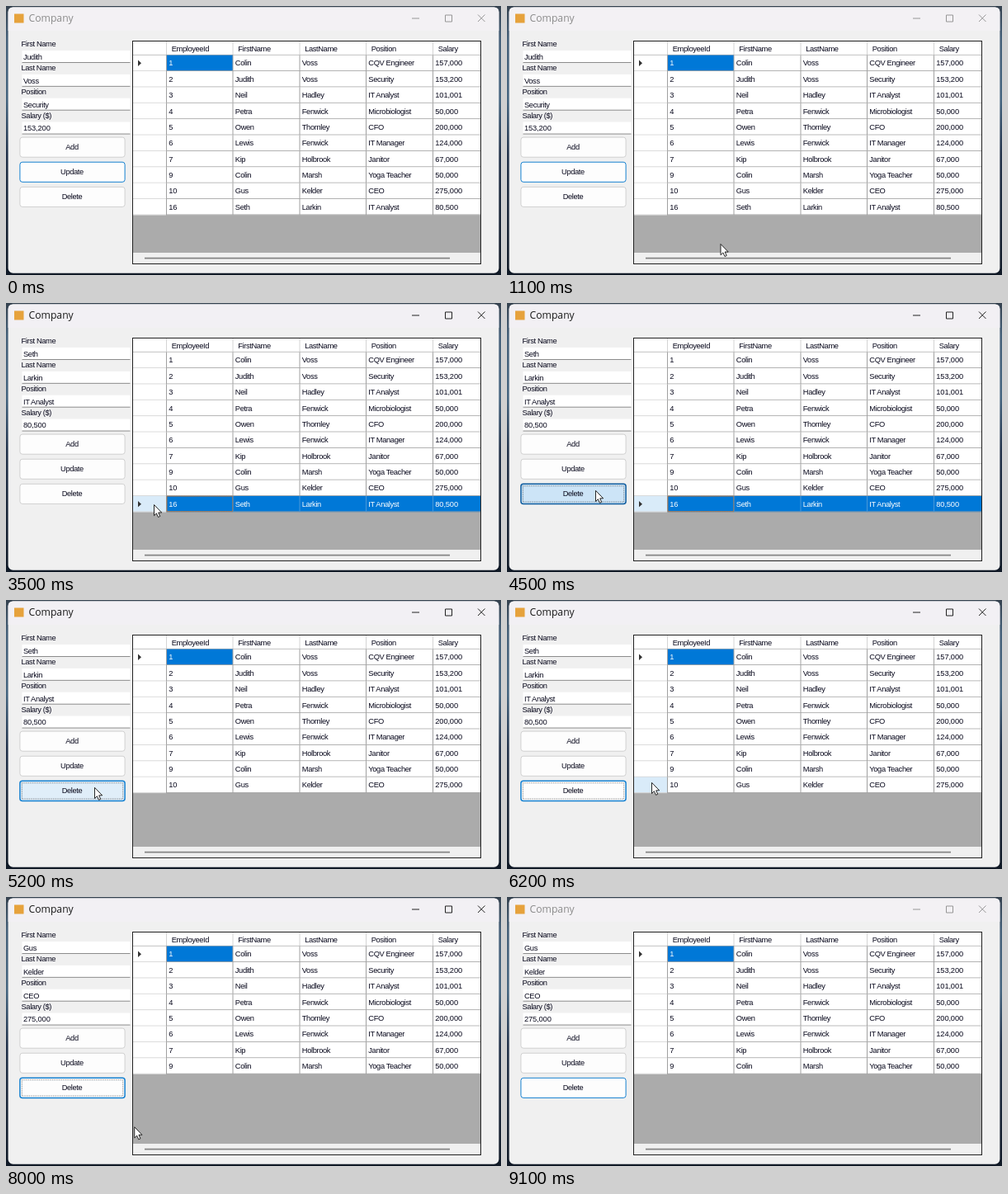
Animation, 600 px wide and 326 px high, one loop 9200 ms. Source, as an HTML page:

```html
<!DOCTYPE html>
<html lang="en">
<head>
<meta charset="utf-8">
<title>Company</title>
<style>
html, body { margin: 0; width: 100%; height: 100%; overflow: hidden; background: #141e2e; }
svg { display: block; width: 600px; height: 326px; }
text { font: 9.3px "Liberation Sans", Arial, sans-serif; letter-spacing: -.37px; fill: #08081c; white-space: pre; }
.num { letter-spacing: -.13px; }
.mid { text-anchor: middle; }
.title { font: 12.2px "Open Sans", "Noto Sans", sans-serif; letter-spacing: 0; }
</style>
</head>
<body>
<svg id="stage" viewBox="0 0 600 326">
  <defs>
    <linearGradient id="sky" x2="0" y2="1">
      <stop offset="0" stop-color="#35424f"/>
      <stop offset=".12" stop-color="#456079"/>
      <stop offset=".35" stop-color="#456580"/>
      <stop offset=".55" stop-color="#22324a"/>
      <stop offset="1" stop-color="#101926"/>
    </linearGradient>
  </defs>
  <rect width="600" height="326" fill="url(#sky)"/>
</svg>
<script>
const LOOP = 9200, STEP = 100;
const stage = document.getElementById('stage');
const PITCH = 19.37, TOP = 59.6;
const cols = [194.5, 275, 356, 436.5, 517.5, 575];
const heads = ['EmployeeId', 'FirstName', 'LastName', 'Position', 'Salary'];
const people = [
  ['1', 'Colin', 'Voss', 'CQV Engineer', '157,000'],
  ['2', 'Judith', 'Voss', 'Security', '153,200'],
  ['3', 'Neil', 'Hadley', 'IT Analyst', '101,001'],
  ['4', 'Petra', 'Fenwick', 'Microbiologist', '50,000'],
  ['5', 'Owen', 'Thornley', 'CFO', '200,000'],
  ['6', 'Lewis', 'Fenwick', 'IT Manager', '124,000'],
  ['7', 'Kip', 'Holbrook', 'Janitor', '67,000'],
  ['9', 'Colin', 'Marsh', 'Yoga Teacher', '50,000'],
  ['10', 'Gus', 'Kelder', 'CEO', '275,000'],
  ['16', 'Seth', 'Larkin', 'IT Analyst', '80,500']
];

// Each step overrides part of the state before it.
const steps = [
  { at: 0, rows: 10, row: 0, full: false, who: 1, focus: 'Update', active: false, down: false },
  { at: 1700, row: 9, who: 9, focus: 'grid', active: true },
  { at: 3200, full: true },
  { at: 4400, focus: 'Delete', down: true },
  { at: 4600, rows: 9, row: 0, full: false, down: false },
  { at: 6400, row: 8, who: 8, full: true, focus: 'grid' },
  { at: 7000, focus: 'Delete', down: true },
  { at: 7200, rows: 8, row: 0, full: false, down: false },
  { at: 8600, active: false }
];

// Pointer path: time, x, y
const path = [
  [700, 286, 332], [1500, 232, 245], [2700, 232, 245], [3100, 179.5, 244.5],
  [3600, 179.5, 244.5], [4200, 107.5, 227.3], [5200, 107.5, 227.3], [6100, 175.5, 221.3],
  [6500, 175.5, 221.3], [6900, 121.5, 225.5], [7600, 121.5, 225.5], [8400, 190, 332]
];

function add(tag, attrs, parent = stage) {
  const el = document.createElementNS('http://www.w3.org/2000/svg', tag);
  set(el, attrs);
  parent.append(el);
  return el;
}
function set(el, attrs) {
  for (const key in attrs) el.setAttribute(key, attrs[key]);
}
function rect(x, y, width, height, fill, more, parent) {
  return add('rect', { x, y, width, height, fill, ...more }, parent);
}
function line(d, stroke, more, parent) {
  return add('path', { d, stroke, fill: 'none', ...more }, parent);
}
function label(x, y, str, cls = '', parent) {
  const el = add('text', { x, y, class: cls }, parent);
  el.textContent = str;
  return el;
}
const show = (el, on) => set(el, { visibility: on ? 'visible' : 'hidden' });

// Window frame and title bar
rect(2.6, 1.6, 594.8, 322.2, '#f0f0f0', { rx: 6 });
const bar = add('path', { d: 'M2.6 30V7.6Q2.6 1.6 8.6 1.6H591.4Q597.4 1.6 597.4 7.6V30Z' });
rect(10, 9.5, 11.5, 11, '#e6a23c');
const title = label(27.5, 19.3, 'Company', 'title');
const controls = line('M492 15H501M532.5 11H540.5V19H532.5ZM572 10.5L580.5 19M580.5 10.5L572 19', '#222');

// Form fields
const fields = ['First Name', 'Last Name', 'Position', 'Salary ($)'].map((name, i) => {
  const y = 54 + i * 28.85;
  label(18.5, y - 4.6, name);
  rect(19.5, y, 131, 14.5, '#fff');
  line(`M19.5 ${y + 14.5}H150.5`, '#8c8c8c');
  return label(21, y + 10.8, '', i === 3 ? 'num' : '');
});

// Buttons
const buttons = ['Add', 'Update', 'Delete'].map((name, i) => {
  const y = 159.1 + i * 30.1;
  const box = rect(16.9, y, 127.2, 24.1, '#fdfdfd', { rx: 3 });
  const cue = rect(19.3, y + 2.4, 122.4, 19.3, 'none', { stroke: '#333', 'stroke-width': .6, 'stroke-dasharray': '.8 .8' });
  label(80, y + 15.1, name, 'mid');
  return { name, y, box, cue };
});

// Table
rect(153.5, 42.5, 422, 270, '#ababab');
rect(154, 43, 421, 17, '#fff');
line(cols.slice(0, 5).map(x => `M${x} 43V60`).join(''), '#d4d4d4');
line('M154 59.4H575', '#a0a0a0');
heads.forEach((name, i) => label(cols[i] + 6.2, 54.6, name));

const rows = people.map((person, i) => {
  const y = TOP + i * PITCH, end = y + PITCH - .3;
  const g = add('g', {});
  const head = rect(154, y, 40.5, PITCH, '#fff', {}, g);
  const cells = person.map((value, c) => {
    const box = rect(cols[c], y, cols[c + 1] - cols[c], PITCH, '#fff', {}, g);
    const text = label(cols[c] + 2.8, y + 12.8, value, c % 4 ? '' : 'num', g);
    return { box, text };
  });
  line(`M154 ${end}H194`, '#d4d4d4', {}, g);
  line(`M194 ${end}H575`, '#a0a0a0', {}, g);
  line(`M194.5 ${y}v${PITCH}`, '#a0a0a0', {}, g);
  const walls = line(cols.slice(1, 5).map(x => `M${x} ${y}v${PITCH}`).join(''), '#a0a0a0', {}, g);
  const cue = rect(195, y + .2, 79.8, PITCH - .8, 'none', { stroke: '#b8723a', 'stroke-dasharray': '1.6 .5' }, g);
  const arrow = add('path', { d: `M160 ${y + 6}l4 3.7l-4 3.7z`, fill: '#333' }, g);
  return { g, y, head, cells, walls, cue, arrow };
});

rect(154, 299, 421, 13.5, '#f0f0f0');
line('M168 305.6H538', '#858585', { 'stroke-width': 1.6 });
rect(153.5, 42.5, 422, 270, 'none', { stroke: '#222' });

const pointer = add('path', {
  d: 'M0 0V13.2L2.9 10.4L5 15L7.2 14L5.2 9.5H9.2Z',
  fill: '#fff', stroke: '#111', 'stroke-width': .9, 'stroke-linejoin': 'round'
});

function stateAt(t) {
  return Object.assign({}, ...steps.filter(s => s.at <= t));
}

function pointerAt(t) {
  const i = path.findIndex(p => p[0] > t);
  if (i < 1) return null;
  const [t0, x0, y0] = path[i - 1], [t1, x1, y1] = path[i];
  const u = (t - t0) / (t1 - t0), k = u * u * (3 - 2 * u);
  return { x: x0 + (x1 - x0) * k, y: y0 + (y1 - y0) * k };
}

const inside = (p, x, y, w, h) => p && p.x >= x && p.x < x + w && p.y >= y && p.y < y + h;

function drawButton(b, s, p) {
  const focused = s.focus === b.name;
  const hover = s.active && inside(p, 17, b.y, 127, 24);
  const pressed = focused && s.down;
  set(b.box, {
    fill: pressed ? '#cce4f7' : hover ? '#e0eef9' : '#fdfdfd',
    stroke: pressed ? '#0f5c9e' : focused || hover ? '#1480d0' : '#d0d0d0',
    'stroke-width': focused && s.active ? 1.5 : 1
  });
  show(b.cue, focused && s.active);
}

function drawRow(r, i, s, p) {
  const current = i === s.row;
  const full = current && s.full;
  const hover = s.active && inside(p, 154, r.y, 40, PITCH);
  set(r.g, { display: i < s.rows ? 'inline' : 'none' });
  set(r.head, { fill: full || hover ? '#d9ebf9' : '#fff' });
  r.cells.forEach((cell, c) => {
    const on = full || (current && c === 0);
    set(cell.box, { fill: on ? '#0078d7' : '#fff' });
    cell.text.style.fill = on ? '#fff' : '';
  });
  set(r.walls, { stroke: full ? '#4a98d8' : '#a0a0a0' });
  show(r.arrow, current);
  show(r.cue, current && i > 0);
}

function draw(t) {
  const s = stateAt(t), p = pointerAt(t);
  set(bar, { fill: s.active ? '#f2f0f4' : '#f3f1f4' });
  title.style.fill = s.active ? '#1a1a1a' : '#8c8c8c';
  set(controls, { stroke: s.active ? '#222' : '#969696' });
  fields.forEach((f, i) => { f.textContent = people[s.who][i + 1]; });
  buttons.forEach(b => drawButton(b, s, p));
  rows.forEach((r, i) => drawRow(r, i, s, p));
  show(pointer, p);
  if (p) set(pointer, { transform: `translate(${p.x} ${p.y})` });
}

const start = performance.now();
let last = -1;
function tick() {
  const t = Math.floor(Math.max(0, performance.now() - start) % LOOP / STEP) * STEP;
  if (t !== last) draw(last = t);
  requestAnimationFrame(tick);
}
tick();
</script>
</body>
</html>
```
